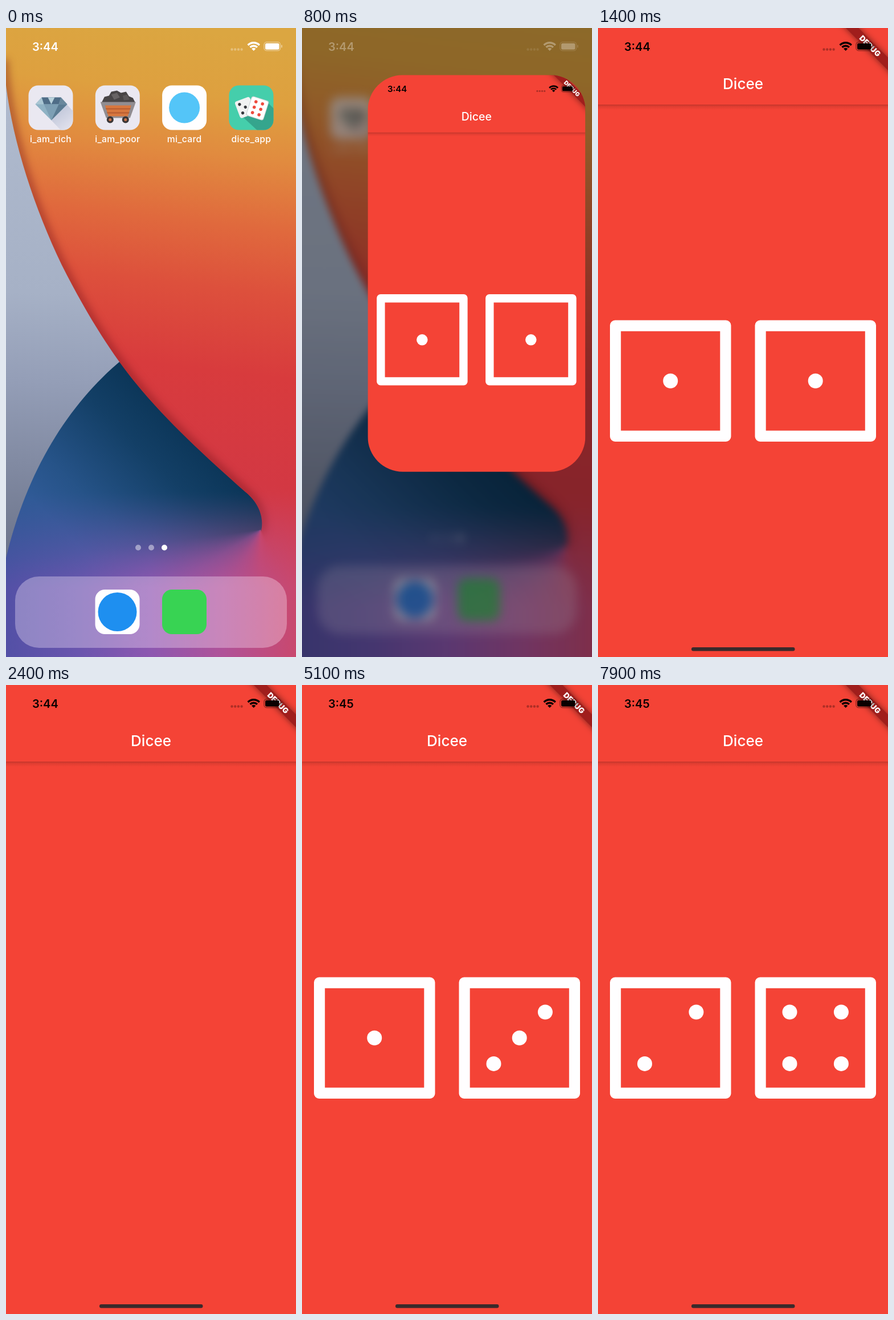
An HTML page with a canvas that plays this animation: 509x1101 px, repeating every 8000 ms.

```html
<!DOCTYPE html>
<html lang="en">
<head>
<meta charset="utf-8">
<title>Dice app</title>
<style>
  html, body { margin: 0; width: 100%; height: 100%; overflow: hidden; background: #000; }
  canvas { display: block; }
</style>
</head>
<body>
<canvas id="stage" width="509" height="1101"></canvas>
<script>
const W = 509, H = 1101, LOOP = 8000, STEP = 100;
const RED = '#f44336', WHITE = '#fffeff';
const screen = document.getElementById('stage').getContext('2d');
let c = screen; // context that the helpers draw on

// ---------- helpers ----------
function layer(draw) {
  const canvas = document.createElement('canvas');
  canvas.width = W;
  canvas.height = H;
  c = canvas.getContext('2d');
  draw();
  c = screen;
  return canvas;
}

function box(x, y, w, h, r, fill) {
  c.fillStyle = fill;
  c.beginPath();
  c.roundRect(x, y, w, h, r);
  c.fill();
}

function disc(x, y, r, fill) {
  c.fillStyle = fill;
  c.beginPath();
  c.arc(x, y, r, 0, 7);
  c.fill();
}

function poly(fill, ...points) {
  c.fillStyle = fill;
  c.beginPath();
  for (let i = 0; i < points.length; i += 2) c.lineTo(points[i], points[i + 1]);
  c.fill();
}

function text(string, x, y, size, weight, align, fill = WHITE) {
  c.font = `${weight} ${size}px Inter, sans-serif`;
  c.textAlign = align;
  c.fillStyle = fill;
  c.fillText(string, x, y);
}

function withStops(g, stops) {
  for (const [at, color] of stops) g.addColorStop(at, color);
  return g;
}

const gradient = (x0, y0, x1, y1, stops) => withStops(c.createLinearGradient(x0, y0, x1, y1), stops);

// Draws in a translated and rotated frame.
function at(x, y, angle, draw) {
  c.save();
  c.translate(x, y);
  c.rotate(angle);
  draw();
  c.restore();
}

// ---------- home screen ----------
function wallpaper() {
  c.fillStyle = gradient(40, 0, 0, H, [[0, '#b2bdd0'], [.42, '#a6b1c6'], [.56, '#949eb7'], [.82, '#6f778e'], [1, '#666c84']]);
  c.fillRect(0, 0, W, H);

  const hill = new Path2D('M203 581C108 660 33 780 -2 937V1101H509V581Z');
  c.fillStyle = gradient(310, 690, 110, 890, [[0, '#0b3557'], [.3, '#133f66'], [.75, '#265388'], [1, '#2f5a96']]);
  c.fill(hill);

  const edge = 'M-4 55C2 170 43 300 98 415C146 510 191 577 228 622C284 690 350 750 420 812C446 833 454 860 447 884';
  const flame = new Path2D(edge + 'V1101H509V0H-4Z');
  c.fillStyle = gradient(300, 0, 170, H, [[0, '#dba641'], [.1, '#dea03f'], [.19, '#e18b3f'], [.3, '#e0693d'],
    [.4, '#dd503c'], [.53, '#d83b3d'], [.7, '#d33843'], [.85, '#cc3f58'], [1, '#c04b80']]);
  c.fill(flame);

  c.save();
  c.clip(flame);
  c.filter = 'blur(7px)';
  c.strokeStyle = 'rgba(120,20,28,.45)';
  c.lineWidth = 15;
  c.stroke(new Path2D(edge));
  c.restore();

  // Glow that fans out to the lower left of the tip.
  c.save();
  c.clip(hill);
  c.fillStyle = withStops(c.createConicGradient(0, 447, 878), [[.17, 'rgba(204,64,92,0)'], [.25, 'rgba(202,66,98,1)'],
    [.33, 'rgba(190,76,140,.75)'], [.41, 'rgba(160,84,168,.45)'], [.48, 'rgba(120,80,170,0)']]);
  c.fillRect(0, 878, W, H);

  // Purple haze that rises from the bottom.
  c.fillStyle = gradient(0, 0, W, 0, [[0, '#5350a6'], [.25, '#6a55ae'], [.5, '#8d57b0'], [.75, '#b05298'], [1, '#c9486e']]);
  for (let y = 810; y < H; y++) {
    c.globalAlpha = Math.min(1, (y - 810) / 170) ** 1.3;
    c.fillRect(0, y, W, 1);
  }
  c.restore();
}

function diamondIcon() {
  box(0, 0, 78, 78, 17, '#eae8f1');
  c.save();
  c.clip();
  poly(gradient(40, 30, 78, 78, [[0, '#b4bdd2'], [1, '#e6e5f0']]), 67, 33, 90, 58, 90, 90, 68, 90, 40, 61);
  c.restore();
  poly('#8fb2c4', 23, 21, 57, 21, 68, 33, 40, 61, 12, 33);
  poly('#4f6d87', 23, 21, 57, 21, 53, 33, 27, 33);
  poly('#a9c6d3', 23, 21, 27, 33, 12, 33);
  poly('#6a889c', 57, 21, 68, 33, 53, 33);
  poly('#7d9fb4', 27, 33, 53, 33, 40, 61);
  poly('#5b7b92', 53, 33, 68, 33, 40, 61);
  poly('#b9d2dc', 34, 21, 40, 33, 46, 21);
}

function cartIcon() {
  box(0, 0, 78, 78, 17, '#eae8f1');
  poly('#484546', 11, 30, 16, 20, 24, 18, 28, 11, 38, 9, 45, 13, 54, 11, 59, 19, 66, 22, 70, 30);
  poly('#676364', 28, 16, 38, 13, 43, 21, 33, 25);
  poly('#5b5758', 48, 18, 56, 16, 60, 25, 50, 26);
  poly('#918d91', 9, 29, 71, 29, 69, 35, 61, 57, 19, 57, 11, 35);
  poly('#d8773e', 17, 35, 63, 35, 57, 54, 23, 54);
  poly('#b65b30', 18, 40, 62, 40, 61, 42, 19, 42);
  poly('#b65b30', 20, 47, 60, 47, 59, 49, 21, 49);
  for (const x of [26, 53]) {
    disc(x, 60, 6, '#3b3637');
    disc(x, 60, 2.5, '#c9734a');
  }
}

function diceIcon() {
  box(0, 0, 78, 78, 17, '#45ceab');
  c.save();
  c.clip();
  poly('#35a58d', 67, 29, 90, 52, 90, 90, 62, 90, 24, 55);
  c.restore();
  at(26, 39, -.36, () => {
    box(-12, -15, 28, 31, 4, '#f1f2f2');
    for (const y of [-8, 8]) disc(-5, y, 2.6, '#36383d');
    disc(3, 0, 2.6, '#36383d');
  });
  at(50, 40, .31, () => {
    box(-16, -18, 32, 36, 4, '#c9d3d3');
    box(-15, -17, 30, 34, 4, WHITE);
    for (const x of [-6, 6]) for (const y of [-10, 0, 10]) disc(x, y, 2.8, '#ef4b3e');
  });
}

function blueDiscIcon() {
  box(0, 0, 78, 78, 17, WHITE);
  disc(39, 39, 27, '#54c5f8');
}

function dock() {
  box(16, 960, 477, 125, 42, 'rgba(255,240,255,.33)');
  at(156.5, 983, 0, () => {
    box(0, 0, 78, 78, 17, WHITE);
    disc(39, 39, 34, '#1e8ff0');
  });
  box(274, 983, 78, 78, 17, '#38d353');
}

function homeItems() {
  const apps = [['i_am_rich', diamondIcon], ['i_am_poor', cartIcon], ['mi_card', blueDiscIcon], ['dice_app', diceIcon]];
  apps.forEach(([name, icon], i) => {
    const x = 39.5 + i * 117.3;
    at(x, 100.5, 0, icon);
    c.letterSpacing = '.3px';
    text(name, x + 39, 200, 15.7, 500, 'center');
  });
  for (const i of [0, 1, 2]) disc(232 + i * 23, 909.5, 5, i < 2 ? 'rgba(255,255,255,.45)' : WHITE);
  dock();
}

function statusBar(time, color) {
  text(time, 46, 39.5, 20, 600, 'left', color);
  const alpha = c.globalAlpha;
  c.globalAlpha = alpha * .3;
  for (let i = 0; i < 4; i++) disc(396.5 + i * 5.7, 37.5, 2.2, color);

  c.strokeStyle = color;
  c.lineWidth = 1.3;
  c.globalAlpha = alpha * .45;
  c.beginPath();
  c.roundRect(453, 24.7, 28.5, 15, 4.5);
  c.stroke();
  box(483, 29.5, 1.8, 5, 1, color);
  c.globalAlpha = alpha;
  box(455, 26.7, 24.5, 11, 2.5, color);

  c.lineWidth = 3.4;
  for (const r of [14.2, 8.8]) {
    c.beginPath();
    c.arc(434.7, 40, r, -2.36, -.78);
    c.stroke();
  }
  c.fillStyle = color;
  c.beginPath();
  c.moveTo(434.7, 40);
  c.arc(434.7, 40, 5.2, -2.36, -.78);
  c.fill();
}

// ---------- dice app ----------
// Each tap: start, length of the ink effect in steps, left and right value.
const taps = [[0, 0, 1, 1], [2400, 2, 3, 5], [3300, 2, 5, 2], [4000, 3, 4, 6], [4800, 3, 1, 3],
  [5600, 2, 6, 5], [6200, 3, 3, 1], [6900, 3, 5, 6], [7700, 2, 2, 4]];

function die(x, value) {
  c.fillStyle = WHITE;
  c.beginPath();
  c.roundRect(x + 21, 511.5, 212.5, 212.5, 9);
  c.rect(x + 40.2, 530.7, 174.1, 174.1);
  c.fill('evenodd');
  const pip = (i, j) => disc(x + 127.2 + i * 45.2, 617.7 + j * 45.2, 13, WHITE);
  if (value % 2) pip(0, 0);
  if (value > 1) { pip(-1, 1); pip(1, -1); }
  if (value > 3) { pip(-1, -1); pip(1, 1); }
  if (value > 5) { pip(-1, 0); pip(1, 0); }
}

function ink(step) {
  c.save();
  c.beginPath();
  c.rect(0, 512, 254.5, 212);
  c.clip();
  c.fillStyle = `rgba(0,0,0,${[.04, .07, .03][step]})`;
  c.fillRect(0, 512, 254.5, 212);
  disc(81.5, 648, [8, 70, 150][step], `rgba(0,0,0,${[.14, .07, .03][step]})`);
  c.restore();
}

function debugBanner() {
  at(W, 0, Math.PI / 4, () => {
    c.shadowColor = 'rgba(0,0,0,.5)';
    c.shadowBlur = 12;
    c.fillStyle = '#a01e1c';
    c.fillRect(-70, 36.6, 140, 15.7);
    c.shadowBlur = 0;
    c.shadowColor = 'transparent';
    text('DEBUG', 0, 49.3, 13.3, 900, 'center');
  });
}

function app(t) {
  c.fillStyle = RED;
  c.fillRect(0, 0, W, H);
  c.fillStyle = gradient(0, 134, 0, 143, [[0, 'rgba(0,0,0,.2)'], [.35, 'rgba(0,0,0,.09)'], [1, 'rgba(0,0,0,0)']]);
  c.fillRect(0, 134, W, 9);
  text('Dicee', 254.5, 106.5, 26, 500, 'center');

  const [start, steps, left, right] = taps.findLast(tap => tap[0] <= t);
  const step = (t - start) / STEP;
  const loading = start === 2400 && step === 0; // images are blank on the first roll
  if (!loading) {
    if (step < steps) ink(step);
    die(0, left);
    die(254.5, right);
  }
  debugBanner();
  statusBar(t < 4500 ? '3:44' : '3:45', '#0a0000');
  box(164, 1084, 181.5, 6.5, 3.2, '#3a2a2b');
}

// ---------- opening ----------
// Remaining distance of a critically damped spring.
function spring(t, start) {
  const x = Math.max(0, t - start) * .016;
  return (1 + x) * Math.exp(-x);
}

const mix = (from, to, rest) => to + (from - to) * rest;

const paper = layer(wallpaper);
const items = layer(homeItems);

function drawLayer(image, scale, blur, alpha) {
  c.save();
  c.globalAlpha = alpha;
  if (blur) c.filter = `blur(${blur}px)`;
  c.translate(W / 2, H / 2);
  c.scale(scale, scale);
  c.drawImage(image, -W / 2, -H / 2);
  c.restore();
}

function home(opened) {
  const zoom = 1 + .12 * opened;
  drawLayer(paper, zoom, 0, 1);
  if (opened) drawLayer(paper, zoom, 9 * opened, 1);
  drawLayer(items, 1 - .065 * opened, 13 * opened, 1 - .42 * opened);
  c.fillStyle = `rgba(0,0,0,${.51 * opened})`;
  c.fillRect(0, 0, W, H);
  c.globalAlpha = Math.max(0, 1 - .95 * opened);
  statusBar('3:44', WHITE);
  c.globalAlpha = 1;
}

function opening(t) {
  const rest = spring(t, 646), tall = spring(t, 673);
  home(1 - rest);
  const w = mix(78, W, rest), h = mix(78, H, tall);
  const x = mix(430.5, W / 2, rest) - w / 2, y = mix(140, H / 2, rest) - h / 2;
  const radius = mix(17, 80, rest) * Math.min(1, rest * 50);
  c.save();
  c.beginPath();
  c.roundRect(x, y, w, h, radius);
  c.clip();
  c.translate(x, y);
  c.scale(w / W, w / W);
  app(t);
  c.globalAlpha = Math.max(0, Math.min(1, (rest - .45) * 2.2));
  if (c.globalAlpha) {
    c.fillStyle = '#45ceab';
    c.fillRect(0, 0, W, H);
    c.scale(W / 78, W / 78);
    diceIcon();
  }
  c.restore();
}

function render(t) {
  if (t >= 1400) return app(t);
  if (t >= 700) return opening(t);
  home(0);
  if (t >= 500) box(391.5, 100.5, 78, 78, 17, 'rgba(0,0,0,.4)');
}

let shown = -1;
function frame() {
  const t = Math.floor(performance.now() % LOOP / STEP) * STEP;
  if (t !== shown) render(shown = t);
  requestAnimationFrame(frame);
}
frame();
</script>
</body>
</html>
```
